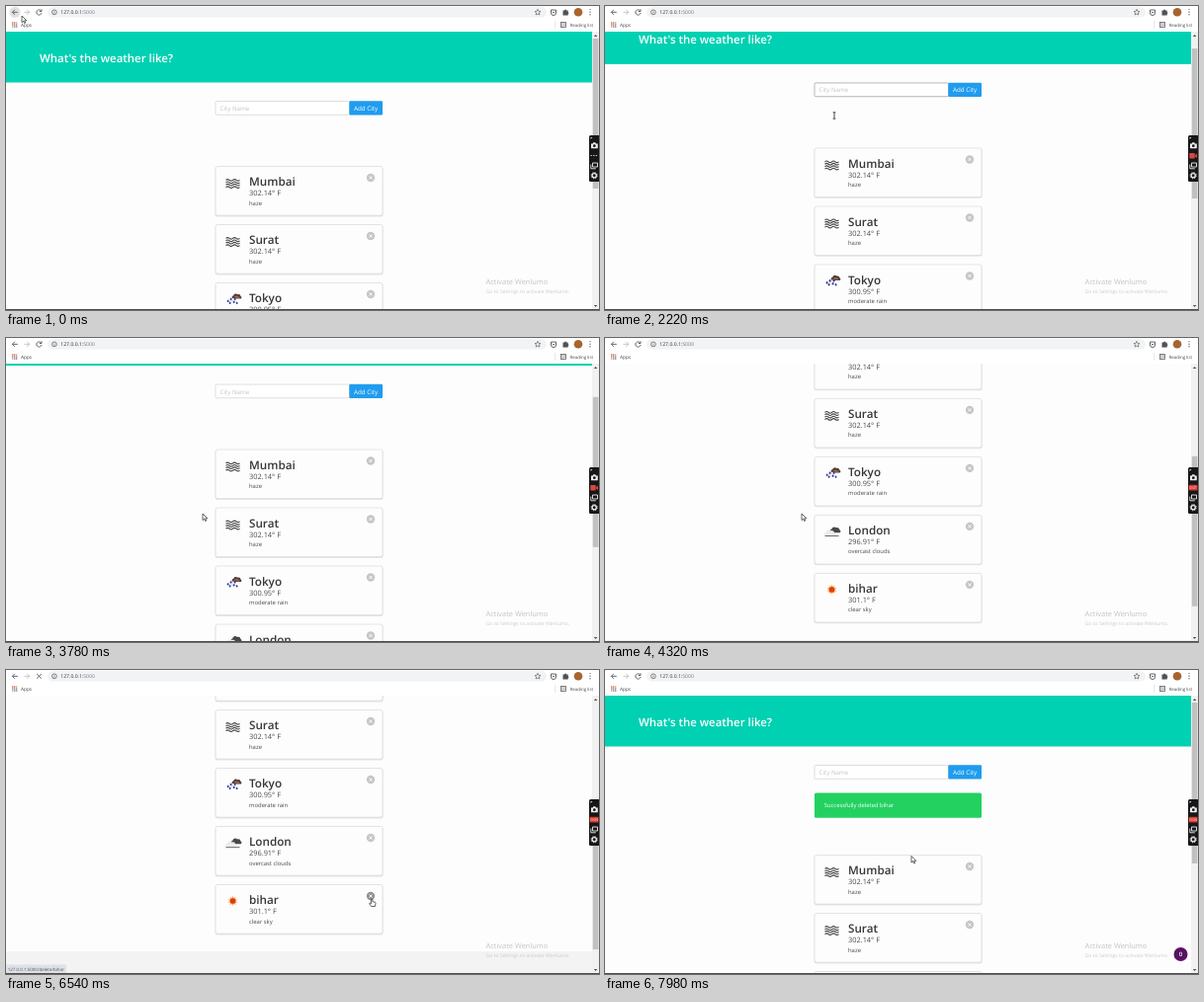
Animation, 600 px wide and 308 px high, one loop 8000 ms. Source, as an HTML page:

```html
<!DOCTYPE html>
<html lang="en">
<head>
<meta charset="utf-8">
<title>Weather page</title>
<style>
html, body { margin: 0; width: 100%; height: 100%; overflow: hidden; background: #fefdfe; }
svg { display: block; width: 600px; height: 308px; }
text { font-family: "Open Sans", "Noto Sans", sans-serif; text-rendering: geometricPrecision; white-space: pre; }
.line { fill: none; stroke: #5f6368; stroke-width: 1; }
.bold { font-weight: 600; }
</style>
</head>
<body>
<svg id="stage" viewBox="0 0 600 308"></svg>
<script>
const LOOP = 8000, CLICK = 5760, RELOAD = 6660;

const text = (x, y, size, str, fill = '#4a4a4a', extra = '') =>
  `<text x="${x}" y="${y}" font-size="${size}" fill="${fill}" ${extra}>${str}</text>`;
const rect = (x, y, w, h, fill, extra = '') =>
  `<rect x="${x}" y="${y}" width="${w}" height="${h}" fill="${fill}" ${extra}/>`;
const circle = (x, y, r, fill, extra = '') =>
  `<circle cx="${x}" cy="${y}" r="${r}" fill="${fill}" ${extra}/>`;
const path = (d, extra = 'class="line"') => `<path d="${d}" ${extra}/>`;
const group = (id, body, extra = '') => `<g id="${id}" ${extra}>${body}</g>`;

// Weather symbols, centred on the origin
const wave = y => `M-7 ${y}q1.75-1.6 3.5 0t3.5 0 3.5 0 3.5 0`;
const cloud = 'M-5 3a2 2 0 0 1 1-3.6 3 3 0 0 1 5-1.6 2.6 2.6 0 0 1 3.6 2.2 1.7 1.7 0 0 1 .4 3z';
const drops = [[-6, 2], [-3, 0], [-4, 4], [0, 3], [1, 0], [3, 4]];
const rays = Array.from({ length: 20 }, (_, i) => {
  const r = i % 2 ? 3 : 5.2, a = i * Math.PI / 10;
  return `${(r * Math.sin(a)).toFixed(2)},${(r * Math.cos(a)).toFixed(2)}`;
}).join(' ');
const icons = {
  haze: path([-3.6, -1.2, 1.2, 3.6].map(wave).join(''), 'fill="none" stroke="#444" stroke-width="1.1"'),
  rain: path(cloud, 'transform="translate(4 -3) scale(.85)" fill="#49403f"') +
    path('M1-2a3.4 3 0 0 1 6 1z', 'fill="#b5653e"') +
    path(cloud, 'transform="translate(-1 1) scale(.85)" fill="#e8e8ef"') +
    drops.map(([x, y]) => path(`M${x} ${y}l1.2-1.6 1 1.8-1 1z`, 'fill="#24318c"')).join(''),
  clouds: path(cloud, 'transform="translate(3.5 -1.5) scale(.95)" fill="#484848"') +
    path(cloud, 'transform="translate(-2 1.6)" fill="#ececec"') +
    path('M-7 4.7H7', 'stroke="#666" stroke-width="1"'),
  sun: `<polygon points="${rays}" fill="#f6a43a"/>` + circle(0, 0, 2.7, '#e0391d')
};

const cities = [
  ['Mumbai', '302.14', 'haze', 'haze'],
  ['Surat', '302.14', 'haze', 'haze'],
  ['Tokyo', '300.95', 'moderate rain', 'rain'],
  ['London', '296.91', 'overcast clouds', 'clouds'],
  ['bihar', '301.1', 'clear sky', 'sun']
];
const card = ([name, temp, sky, icon], i) => group('card' + i,
  rect(211.6, 1, 170, 50.4, '#e4e4e6', 'rx="2"') +
  rect(212, .5, 169, 49.6, '#fefdfe', 'rx="2" stroke="#dedee0" stroke-width=".8"') +
  `<g transform="translate(229.5 ${icon === 'haze' ? 18 : 17})">${icons[icon]}</g>` +
  text(246, 20.3, 11.7, name, '#363636', 'class="bold"') +
  text(246, 30.4, 7.4, temp + '° F') +
  text(246, 39.6, 5.9, sky) +
  circle(369, 12, 4.2, '#c6c6c7', `id="del${i}"`) +
  path('M367.5 10.5l3 3m0-3l-3 3', 'stroke="#fff" stroke-width=".9"'),
  `transform="translate(0 ${162 + 59 * i})"`);

const page =
  rect(0, 26, 593, 51.5, '#00d1b2') +
  text(34, 56.8, 11.45, "What's the weather like?", '#fff', 'class="bold"') +
  rect(212, 96.5, 135.5, 13.8, '#fff', 'id="field" stroke-width=".9" rx="1"') +
  text(216.5, 106, 6.2, 'City Name', '#c4c4c8') +
  rect(347.3, 96.2, 33.7, 14.4, '#209cee', 'rx="1"') +
  text(352, 106, 6.25, 'Add City', '#fff') +
  group('notice', rect(212, 124.5, 169, 25.2, '#23d160', 'rx="1.5"') +
    text(221.8, 139.4, 5.85, 'Successfully deleted bihar', '#fff')) +
  group('cards', cities.map(card).join('')) +
  rect(0, 466, 593, 40, '#f3f3f4', 'id="foot"');

const appDots = ['#e0584b', '#e0584b', '#d8a04a', '#e0584b', '#6b9b6b', '#5b86d8', '#d8a04a', '#5b86d8', '#e0584b']
  .map((c, i) => rect(6 + i % 3 * 2, 16.3 + (i / 3 | 0) * 2, 1.4, 1.4, c)).join('');

const browser =
  rect(0, 0, 600, 26, '#fff') +
  rect(42, 1, 505, 10.6, '#f1f3f4', 'rx="5.3"') +
  circle(9, 6.3, 5.6, '#dfe1e3', 'id="backHover"') +
  path('M11.8 6.3H6.5m2.4-2.5L6.4 6.3l2.5 2.5') +
  path('M18.5 6.3h5.2m-2.4-2.5l2.5 2.5-2.5 2.5', 'fill="none" stroke="#c3c5c8"') +
  path('M35.6 5A2.6 2.6 0 1 0 36 7M36 3.3V5.5H33.8', 'id="reload" class="line"') +
  path('M31.2 4l4.6 4.6m0-4.6l-4.6 4.6', 'id="stop" class="line"') +
  circle(48.9, 6.3, 2.4, 'none', 'stroke="#5f6368" stroke-width=".8"') +
  path('M48.9 6v1.6m0-2.7v.6', 'stroke="#5f6368" stroke-width=".7"') +
  text(55.3, 8.3, 5.1, '127.0.0.1:<tspan fill="#777b80">5000</tspan>', '#303236') +
  path('M538 3.3l.9 2 2.1.2-1.6 1.4.5 2.1-1.9-1.1-1.9 1.1.5-2.1L535 5.5l2.1-.2z', 'fill="none" stroke="#5f6368" stroke-width=".7"') +
  path('M551.5 4h5v3a2.5 2.5 0 0 1-5 0zM552.7 5.8l1.3 1.3 1.3-1.3') +
  path('M563.5 4.5h1.6a1 1 0 0 1 2 0h1.6v1.7a1 1 0 0 1 0 1.9v1.5h-5.2z', 'fill="#4f5358"') +
  circle(579, 6.3, 4.3, '#a8642f') +
  [3.6, 6.2, 8.8].map(y => circle(591, y, .7, '#5f6368')).join('') +
  appDots +
  text(15, 20.8, 4.75, 'Apps', '#44474b') +
  rect(555.5, 15, .7, 8, '#d5d7da') +
  rect(561.5, 16.4, 5, 5, 'none', 'stroke="#5f6368" stroke-width=".8"') +
  path('M563 16.4v5m1-3.5h2m-2 1.8h2', 'stroke="#5f6368" stroke-width=".6"') +
  text(570.6, 20.7, 4.4, 'Reading list', '#44474b');

const scrollbar =
  rect(593, 26, 7, 281, '#f1f1f1') +
  path('M594.8 31l1.8-2 1.8 2zM594.8 303l1.8 2 1.8-2z', 'fill="#505050"') +
  rect(593.8, 33, 5.6, 152, '#c1c1c1', 'id="thumb"');

const recorder =
  rect(590, 131, 12, 47, '#17171a', 'rx="1.5"') +
  path('M591.5 135v-2h2zl2 2', 'fill="#ddd"') +
  path('M592 139.4h1.6l.7-1.2h2l.7 1.2h1.8v4.8H592z', 'fill="#eee"') +
  circle(595.3, 141.7, 1.4, '#17171a') +
  group('idle', path('M591.5 151.5h7', 'stroke="#ddd" stroke-width=".9" stroke-dasharray="1.4 1.2"')) +
  group('camera', rect(591.3, 149, 5.4, 5.4, '#d8493f', 'rx=".6"') + path('M597 151.2l2-1.6v4.4l-2-1.6z', 'fill="#d8493f"')) +
  group('timer', rect(590.7, 148.8, 8.8, 5.8, '#d8392f', 'rx=".6"') +
    text(595.1, 153.3, 4, '', '#fff', 'id="clock" text-anchor="middle"')) +
  path('M593.5 159h5v4h-5zM591.8 160.6v4.2h5', 'fill="none" stroke="#eee" stroke-width=".9"') +
  circle(595.2, 171.7, 2.1, 'none', 'stroke="#eee" stroke-width="1.3"') +
  circle(595.2, 171.7, 3.1, 'none', 'stroke="#eee" stroke-width="1" stroke-dasharray="1.2 1.235"');

const pointers = {
  arrow: path('M0 0v6.6l1.6-1.4 1 2.3 1.1-.5-1-2.2h2.1z', 'fill="#fff" stroke="#222" stroke-width=".7"'),
  beam: path('M-1.4-3.2h2.8m-1.4 0v6.4m-1.4 0h2.8', 'fill="none" stroke="#222" stroke-width=".8"'),
  hand: path('M-.6.6a.7.7 0 0 1 1.4 0v2l2.7.7q.7.3.5 1.2l-.6 3H-.4l-2-2.8q.2-.9 1.2-.4l.6.5z', 'fill="#fff" stroke="#222" stroke-width=".7"')
};

document.getElementById('stage').innerHTML =
  group('page', page) + scrollbar +
  text(485.6, 282.3, 7.45, 'Activate Wenlumo', '#c2c2c5') +
  text(485.6, 290.8, 5.1, 'Go to Settings to activate Wenlumo.', '#cacacd') +
  group('badge', circle(582.5, 288, 7, '#5a1263') + text(582.5, 290.3, 6, '0', '#fff', 'text-anchor="middle" class="bold"')) +
  group('status', rect(-2, 298.5, 63, 9, '#dee1e6', 'rx="1"') +
    text(1.8, 304.8, 4.45, '127.0.0.1:5000/delete/bihar', '#4c5055')) +
  browser + recorder +
  rect(0, 307, 600, 1, '#55504f') +
  group('pointer', Object.entries(pointers).map(([id, body]) => group(id, body)).join(''));

const $ = id => document.getElementById(id);
const show = (id, on) => { $(id).style.display = on ? '' : 'none'; };

// Keys are [time, ...values]; linear between neighbours
const scrollKeys = [[1980, 0], [2220, 18.5], [2460, 33.5], [2700, 33.5], [3360, 40.5], [3660, 49.5],
  [3840, 49.5], [4200, 143], [4320, 160], [4500, 181]];
const pointerKeys = [[60, 16, 10], [480, 24, 30], [880, 36, 53], [1260, 130, 84], [1700, 232, 111],
  [2700, 232, 111], [3300, 199, 178], [4440, 199, 178], [5040, 300, 208], [5640, 370, 232],
  [7120, 370, 232], [7500, 221, 134], [7700, 250, 150], [7960, 310, 188.5]];

function at(keys, t) {
  const i = keys.findIndex(k => k[0] > t);
  if (i === 0) return keys[0].slice(1);
  if (i < 0) return keys[keys.length - 1].slice(1);
  const a = keys[i - 1], b = keys[i], p = (t - a[0]) / (b[0] - a[0]);
  return a.slice(1).map((v, n) => v + (b[n + 1] - v) * p);
}

function draw(t) {
  const done = t >= RELOAD;
  const scroll = done ? 0 : at(scrollKeys, t)[0];
  const hover = t >= 5580 && !done;
  const loading = t >= CLICK && !done;

  $('page').setAttribute('transform', `translate(0 ${-scroll})`);
  $('cards').setAttribute('transform', `translate(0 ${done ? 25 : 0})`);
  $('field').setAttribute('stroke', t > 1600 && t < 2700 ? '#b0b0b3' : '#dbdbde');
  $('thumb').setAttribute('y', 33 + scroll * .542);
  $('thumb').setAttribute('height', done ? 163 : 152);
  $('del4').setAttribute('fill', hover ? '#939396' : '#c6c6c7');
  show('notice', done);
  show('badge', done);
  show('card4', !done);
  show('foot', !done);
  show('status', hover);
  show('backHover', t < 300);
  show('stop', loading);
  show('reload', !loading);

  show('idle', t < 600);
  show('camera', t >= 600 && t < 4000);
  show('timer', t >= 4000);
  $('clock').textContent = '0:0' + Math.floor(t / 1000 - 3);

  const kind = hover ? 'hand' : t > 1400 && t < 2900 ? 'beam' : 'arrow';
  for (const id in pointers) show(id, id === kind);
  $('pointer').setAttribute('transform', `translate(${at(pointerKeys, t)})`);
}

const start = performance.now();
function tick() {
  draw((performance.now() - start) % LOOP);
  requestAnimationFrame(tick);
}
tick();
</script>
</body>
</html>
```
